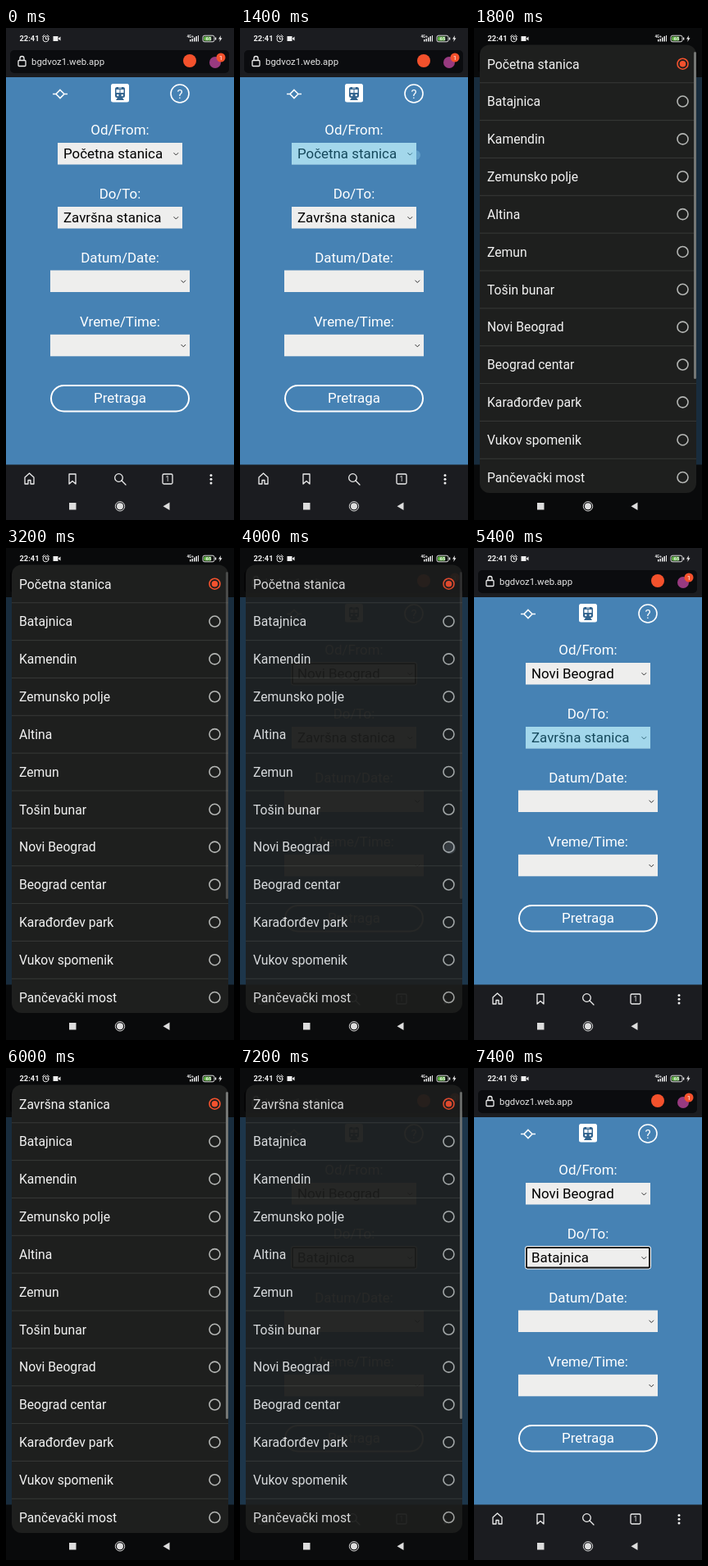
An HTML page that plays this animation: 278x600 px, repeating every 8 s.

```html
<!DOCTYPE html>
<html lang="sr">
<head>
<meta charset="utf-8">
<style>
  html, body { margin: 0; width: 100%; height: 100%; overflow: hidden; background: #000; }
  svg { display: block; width: 278px; height: 600px; font-family: Roboto, sans-serif; }
  .line { fill: none; stroke: #eee; stroke-width: 1.3; stroke-linecap: round; stroke-linejoin: round; }
  .form { font-size: 16.9px; fill: #fff; }
  .mid { text-anchor: middle; }
  #rows { font-size: 15.7px; fill: #f2f2f2; }
</style>
</head>
<body>
<svg viewBox="0 0 278 600">
  <rect width="278" height="600" fill="#1b1c20"/>
  <g id="browser">
    <rect x="5" y="27" width="267" height="28" rx="5" fill="#0b0c0f"/>
    <g class="line"><rect x="15" y="39.500" width="9" height="7" rx="1"/><path d="M17 39v-2a2.500 2.500 0 0 1 5 0v2"/></g>
    <text x="31" y="45" font-size="11.4" fill="#e4e4e4">bgdvoz1.web.app</text>
    <circle cx="224" cy="40" r="8" fill="#f3512c"/>
    <circle cx="255" cy="42" r="7" fill="#983a80"/>
    <circle cx="262" cy="36" r="5.500" fill="#f3512c"/>
    <text class="mid" x="262" y="38.800" font-size="8" fill="#fff">1</text>
    <rect y="60" width="278" height="472.500" fill="#4682b4"/>
    <g class="line">
      <path d="M23 548l5.500-5 5.500 5v8h-4v-4.500h-3v4.500h-4z"/>
      <path d="M77 544h8v12l-4-3.500-4 3.500z"/>
      <circle cx="137.500" cy="548.500" r="4.800"/><path d="M141 552l5 5"/>
      <rect x="191" y="544" width="12" height="12" rx="1.500"/>
    </g>
    <text class="mid" x="197" y="553" font-size="8.500" fill="#eee">1</text>
    <g fill="#eee"><circle cx="250" cy="545.500" r="1.500"/><circle cx="250" cy="550.300" r="1.500"/><circle cx="250" cy="555" r="1.500"/></g>
  </g>

  <g class="form">
    <g fill="none" stroke="#fff" stroke-width="1.600">
      <path d="M66 75.500l5 5-5 5-5-5zM57 80.500h4M71 80.500h4"/>
      <circle cx="212" cy="80" r="11"/>
      <rect x="55" y="436" width="168" height="31.500" rx="15.700" stroke-width="2"/>
    </g>
    <rect x="128" y="68" width="22" height="22.500" rx="2.500"/>
    <g fill="#34658f">
      <rect x="133" y="72" width="12" height="13" rx="2.500"/>
      <path d="M134 88l2-3h6l2 3z"/>
    </g>
    <path d="M134.500 75h4v4h-4zM139.500 75h4v4h-4zM137 72.500h4v1h-4z"/>
    <circle cx="136.300" cy="82" r="1.200"/><circle cx="141.700" cy="82" r="1.200"/>
    <g class="mid">
      <text x="212" y="85.500" font-size="15">?</text>
      <text x="139" y="130">Od/From:</text>
      <text x="139" y="208">Do/To:</text>
      <text x="139" y="286">Datum/Date:</text>
      <text x="139" y="364">Vreme/Time:</text>
      <text x="139" y="457">Pretraga</text>
    </g>
    <g id="selects"></g>
    <circle id="tap" cx="214" cy="155" r="6" fill="#8fd0ee" opacity=".35"/>
  </g>

  <rect id="dim" width="278" height="600"/>
  <g id="dialog">
    <rect x="7" y="20.500" width="264" height="546.500" rx="12" fill="#1e1f1e"/>
    <g id="rows"></g>
    <rect id="scrollbar" x="268" y="29" width="3" height="399" rx="1.500" fill="#747674"/>
  </g>
  <circle id="rowTap" cx="256" cy="366" r="7" fill="#9ab" opacity=".2"/>

  <g id="system" fill="#eee">
    <text x="16.500" y="16.300" font-size="9.300" font-weight="600">22:41</text>
    <g class="line" style="stroke-width:1"><circle cx="48.500" cy="13.300" r="3.500"/><path d="M48.500 11.500v2h1.500M44.500 10.500l2-2M52.500 10.500l-2-2"/></g>
    <path d="M57.500 10h6v6h-6zM64 12.500l2.500-2v5l-2.500-2z"/>
    <text x="220.500" y="11.500" font-size="4.500" font-weight="600">4G+</text>
    <path d="M224 14h1.500v2.500h-1.500zM226.500 13h1.500v3.500h-1.500zM229 11.500h1.500v5h-1.500zM231.500 10h1.500v6.500h-1.500zM234 9h1v7.500h-1z"/>
    <rect x="240" y="9.200" width="14" height="7.600" rx="2" fill="none" stroke="#ddd"/>
    <rect x="241.200" y="10.400" width="9" height="5.200" rx="1" fill="#62b845"/>
    <path d="M255 11.500h1.300v3h-1.300zM262 9l-3 4.500h2l-.8 3.500 3.300-4.800h-2z"/>
    <text class="mid" x="247" y="15.300" font-size="6" font-weight="600">65</text>
    <rect x="77" y="579" width="8.500" height="8.500" fill="#ddd"/>
    <circle cx="139" cy="583.300" r="4" fill="#ddd"/><circle cx="139" cy="583.300" r="5.700" fill="none" stroke="#ddd"/>
    <path d="M199.500 578.500v9.500l-8-4.750z" fill="#ddd"/>
  </g>
</svg>
<script>
const $ = id => document.getElementById(id);
const show = (el, on) => el.setAttribute('visibility', on ? 'visible' : 'hidden');
const fade = (id, alpha) => $(id).setAttribute('opacity', alpha);

const select = (x, y, w, name = '') => `
  <rect x="${x}" y="${y}" width="${w}" height="26.500" fill="#eeeeed"/>
  <text id="${name}" x="70" y="${y + 19}" fill="#000"></text>
  <path d="M${x + w - 10.5} ${y + 12.2}l2.800 2.800 2.800-2.800" fill="none" stroke="#333"/>
  ${name && `<g id="${name}Ring" fill="none">
    <rect x="62.500" y="${y - .5}" width="153" height="27.500" rx="2.500" stroke="#fff"/>
    <rect x="64" y="${y + 1}" width="150" height="24.500" rx="1.500" stroke="#101010" stroke-width="2"/></g>
  <rect id="${name}Tap" x="${x}" y="${y}" width="${w}" height="26.500" fill="#33b5e5" opacity=".4"/>`}`;

$('selects').innerHTML = select(63, 140, 152, 'from') + select(63, 218, 152, 'to') +
  select(54, 295.5, 170) + select(54, 373.8, 170);

const stations = ['', 'Batajnica', 'Kamendin', 'Zemunsko polje', 'Altina', 'Zemun', 'Tošin bunar',
  'Novi Beograd', 'Beograd centar', 'Karađorđev park', 'Vukov spomenik', 'Pančevački most'];
$('rows').innerHTML = stations.map((name, i) => {
  const y = 43.7 + i * 45.85, color = i ? '#b4b6b4' : '#f4522e';
  return `<text x="16" y="${y + 5.8}">${name}</text>
    <circle cx="254.500" cy="${y}" r="6.500" fill="none" stroke="${color}" stroke-width="1.600"/>
    ${i ? `<path d="M7 ${y - 22.8}h264" stroke="#373937"/>` : `<circle cx="254.500" cy="${y}" r="3.800" fill="${color}"/>`}`;
}).join('');
const heading = $('rows').querySelector('text');

// [start ms, opacity] of the station list
const listSteps = [[0, 0], [1600, .5], [1800, 1], [4000, .88], [4200, 0],
  [5600, .5], [5800, .96], [6000, 1], [7200, .88], [7400, 0]];

function draw() {
  const t = Math.floor(performance.now() % 8000 / 200) * 200;
  const within = (a, b) => t >= a && t < b;
  const list = listSteps.filter(s => s[0] <= t).pop()[1];

  $('from').textContent = t < 3800 ? 'Početna stanica' : 'Novi Beograd';
  $('to').textContent = t < 7000 ? 'Završna stanica' : 'Batajnica';
  heading.textContent = t < 5000 ? 'Početna stanica' : 'Završna stanica';

  show($('fromTap'), within(1400, 1800));
  show($('tap'), within(1400, 1600));
  show($('toTap'), within(5400, 6000));
  show($('fromRing'), within(3800, 5200));
  show($('toRing'), t >= 7000);
  show($('rowTap'), within(3800, 4200));

  fade('dialog', list);
  fade('dim', list * .66);
  fade('scrollbar', within(3000, 4200) ? Math.max(.25, 1 - (t - 2800) / 800) : 1);
  requestAnimationFrame(draw);
}
draw();
</script>
</body>
</html>
```
